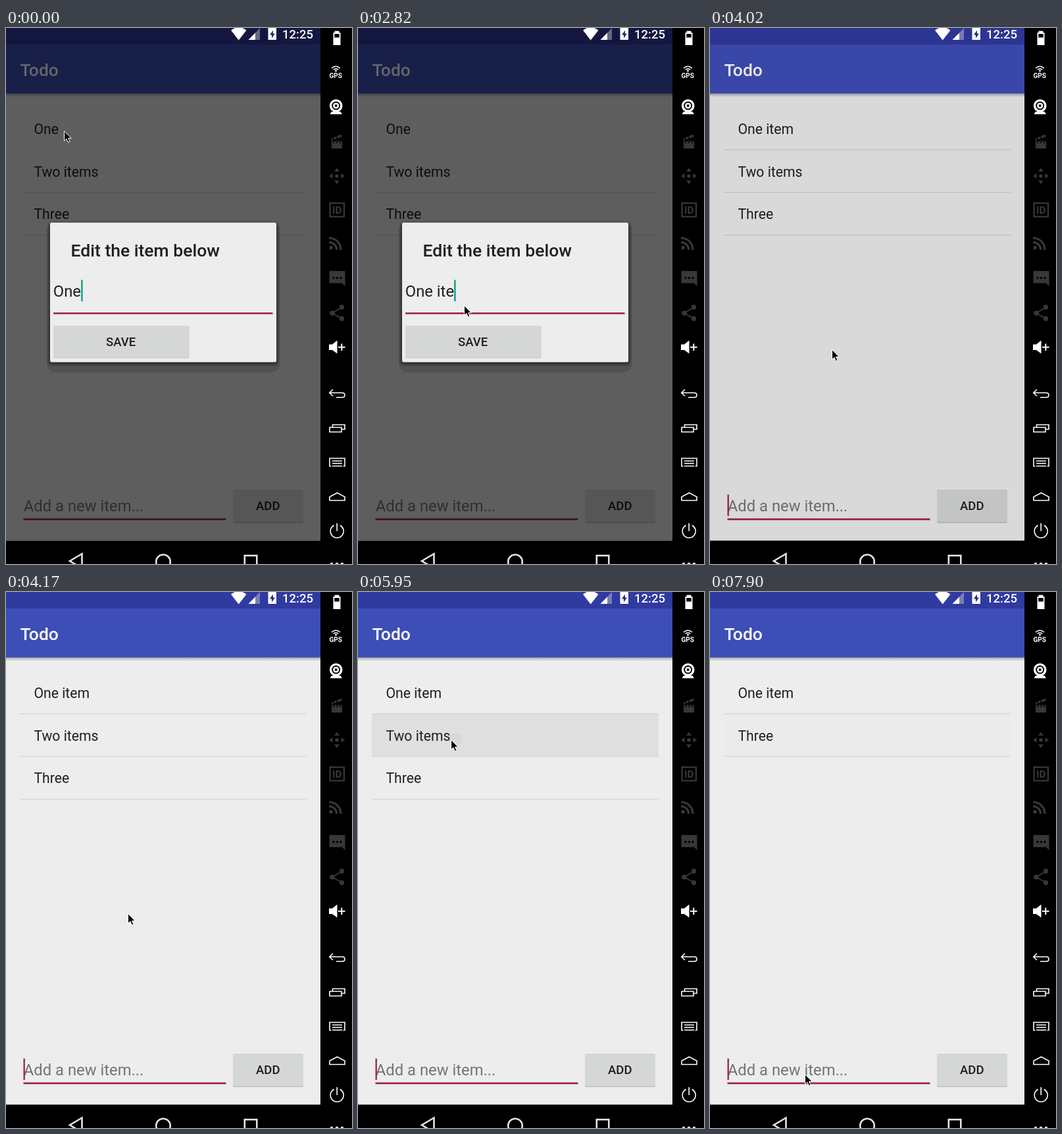
These frames come from a looping animation (526x814 px, 8000 ms). An HTML page:

```html
<!DOCTYPE html>
<html lang="en">
<head>
<meta charset="utf-8">
<title>Todo list</title>
<style>
html, body { margin: 0; width: 100%; height: 100%; overflow: hidden; background: #000; }
svg { display: block; width: 526px; height: 814px; font-family: Roboto, sans-serif; }
text { white-space: pre; }
.item { font-size: 21.2px; fill: #1f1f1f; }
.title { font-size: 26.5px; font-weight: 500; }
.field { font-size: 23.8px; }
.button { font-size: 18.5px; font-weight: 500; fill: #1f1f1f; text-anchor: middle; }
.off { fill: #373737; }
.line { fill: none; stroke: #fff; stroke-width: 1.6; }
</style>
</head>
<body>
<svg viewBox="0 0 526 814">
  <defs>
    <linearGradient id="fall" x2="0" y2="1">
      <stop offset="0" stop-opacity=".3"/>
      <stop offset="1" stop-opacity="0"/>
    </linearGradient>
    <filter id="soft" x="-10%" y="-10%" width="120%" height="120%"><feGaussianBlur stdDeviation="2"/></filter>
    <clipPath id="rowClip"><rect x="21" y="185" width="436" height="65"/></clipPath>
    <clipPath id="rss"><path d="M491 317h21v20h-21z"/></clipPath>
  </defs>
  <rect width="526" height="814"/>

  <!-- app -->
  <rect width="478" height="778.5" fill="#ededed"/>
  <rect y="99" width="478" height="6" fill="url(#fall)"/>
  <rect width="478" height="25" fill="#303a9f"/>
  <rect y="25" width="478" height="74.5" fill="#3d4eb8"/>
  <text class="title" x="21.4" y="72.5" fill="#fff">Todo</text>
  <g id="press">
    <rect x="21" y="185" width="436" height="65" fill="#000" fill-opacity=".058"/>
    <circle id="ripple" cx="148" cy="224" r="10" fill-opacity=".035" clip-path="url(#rowClip)"/>
  </g>
  <g fill="#d3d3d3">
    <rect id="rule1" x="21" y="184.3" width="436" height="1.2"/>
    <rect x="21" y="249" width="436" height="1.2"/>
    <rect id="rule3" x="21" y="314" width="436" height="1.2"/>
  </g>
  <text class="item" id="item1" x="42.4" y="161"></text>
  <text class="item" id="item2" x="42.4" y="225.5"></text>
  <text class="item" id="item3" x="42.4" y="290">Three</text>
  <text class="field" x="26.8" y="734" fill="#757575">Add a new item...</text>
  <rect x="26.5" y="744.7" width="308" height="2.7" fill="#9b2149"/>
  <rect id="caret" x="26.5" y="708.5" width="2.3" height="32.5" fill="#9b2149"/>
  <rect x="345" y="702" width="107" height="50" rx="2.5" fill-opacity=".17"/>
  <rect x="345" y="701" width="107" height="49" rx="2.5" fill="#d5d7d6"/>
  <text class="button" x="398.3" y="732.3">ADD</text>
  <rect id="dim" width="478" height="778.5"/>

  <!-- status bar -->
  <g fill="#fff">
    <path d="M342 3.5Q353.5 -5.500 365.500 3.500L353.700 18.500Z"/>
    <path d="M368.500 18L386 0V18Z" fill-opacity=".35"/>
    <path d="M368.500 18L379 7.500V18Z"/>
    <path d="M398.500 0H411V18H398.500Z"/>
    <text x="420" y="16" font-size="18.5" font-weight="500">12:25</text>
  </g>
  <path d="M406 3.500L400.800 10.500H404V15.500L409 8.500H406Z" fill="#252d75"/>

  <!-- dialog -->
  <g id="dialog">
    <rect x="62" y="294" width="354.500" height="229" rx="14" fill-opacity=".13"/>
    <rect x="65" y="296" width="348" height="215" rx="4" fill-opacity=".5" filter="url(#soft)"/>
    <rect x="67" y="295.500" width="344" height="212" rx="2.500" fill="#ededed"/>
    <text class="title" x="98.500" y="347" fill="#1f1f1f">Edit the item below</text>
    <text class="field" id="entry" x="71.800" y="408" fill="#1f1f1f"></text>
    <rect id="entryCaret" y="382.500" width="2.400" height="32.500" fill="#0d9c8c"/>
    <rect x="72" y="432" width="333.500" height="2.600" fill="#a0224e"/>
    <rect x="72" y="453" width="206.500" height="48.500" rx="2.500" fill-opacity=".14"/>
    <rect x="72" y="452" width="206.500" height="48" rx="2.500" fill="#d5d7d6"/>
    <text class="button" x="174.700" y="483">SAVE</text>
  </g>

  <!-- navigation bar -->
  <g fill="none" stroke="#e3e3e3" stroke-width="2.600">
    <path d="M115.500 798.500L97 809.500L115.500 820.500Z"/>
    <circle cx="239" cy="810.500" r="10.800"/>
    <rect x="362.800" y="801.200" width="18.500" height="18.500"/>
  </g>

  <!-- tool strip -->
  <rect x="478" width="48" height="814"/>
  <g fill="#fff">
    <path d="M499.500 4.500H506.500V7H508.500V26H497.500V7H499.500Z"/>
    <rect x="499.300" y="9" width="7.400" height="5.500" fill="#000"/>
    <text x="501.200" y="75.500" font-size="10" font-weight="700" text-anchor="middle">GPS</text>
    <circle cx="501.500" cy="65" r="1.500"/>
    <path class="line" d="M495 61Q501.500 55.500 508 61M497.700 63.500Q501.500 60 505.300 63.500"/>
    <circle cx="501.700" cy="118" r="9.800"/>
    <circle cx="501.700" cy="118" r="6.500" fill="#000"/>
    <circle cx="501.700" cy="118" r="4.600"/>
    <circle cx="501.700" cy="118" r="2" fill="#000"/>
    <path d="M495 127L492.500 131H511L508.500 127Z"/>
    <path d="M491 480.500H496L503.500 474.500V494.500L496 489H491Z"/>
    <path d="M505 483.800H509.300V479.500H511.300V483.800H515.500V485.800H511.300V490H509.300V485.800H505Z"/>
    <circle cx="495" cy="814" r="2.200"/><circle cx="503" cy="814" r="2.200"/><circle cx="511" cy="814" r="2.200"/>
  </g>
  <g class="off">
    <path d="M495 171.500H511V183H495ZM494.500 168L509.500 161.500L511 165L495.500 170.500Z"/>
    <path d="M497 175L499.500 171.500M502 175L504.500 171.500M507 175L509.500 171.500M498 170L498 166M503 168L502.500 164" stroke="#000" stroke-width="1.300"/>
    <circle cx="503" cy="224.700" r="2.800"/>
    <path d="M503 212.500L507 218H499ZM503 237L507 231.500H499ZM491 224.700L496.500 220.700V228.700ZM515 224.700L509.500 220.700V228.700Z"/>
    <rect x="492.500" y="266" width="21.500" height="20.500" fill="none" stroke="#373737" stroke-width="2.200"/>
    <text x="503.300" y="282" font-size="15.500" font-weight="700" text-anchor="middle">ID</text>
    <circle cx="494" cy="333.700" r="2.700"/>
    <g clip-path="url(#rss)" fill="none" stroke="#373737" stroke-width="3.200">
      <circle cx="491.500" cy="336.500" r="11"/><circle cx="491.500" cy="336.500" r="17.500"/>
    </g>
    <path d="M491.500 369H515.500V392L511 387.500H491.500Z"/>
    <g fill="#000"><circle cx="498" cy="379.500" r="1.700"/><circle cx="503.500" cy="379.500" r="1.700"/><circle cx="509" cy="379.500" r="1.700"/></g>
    <path d="M511 424L496 433L511 441.500" fill="none" stroke="#373737" stroke-width="2"/>
    <circle cx="510.500" cy="424" r="3.700"/><circle cx="496" cy="433" r="3.700"/><circle cx="510.500" cy="441.500" r="3.700"/>
  </g>
  <g class="line">
    <path d="M497 549L491.800 554L497 559M492 554H511Q515 554 515 557.500T511 561H502"/>
    <path d="M492 606.500H510V613.500H492ZM496.500 606V602.500H515V609.500H510.500"/>
    <path d="M494.500 665.500H492V653.500H515V665.500H512.500M496 657.500H511M496 661.300H511M496 665.200H511"/>
    <path d="M492 717.500V712L503.500 706L515 712V717.500Z"/>
    <path d="M498.700 755.300A10 10 0 1 0 507.700 755.300M503.200 752V764"/>
  </g>

  <path id="pointer" d="M0 0V14.800L3.400 11.700L5.900 17.200L8.400 16.100L6 10.900H10.600Z" fill="#000" stroke="#fff" stroke-width="1"/>
</svg>
<script>
const LOOP = 8000;
const $ = id => document.getElementById(id);
const set = (id, name, value) => $(id).setAttribute(name, value);
const show = (id, on) => set(id, 'visibility', on ? 'visible' : 'hidden');

// The screen refreshes in steps, so each value holds until the next one.
const hold = (steps, t) => steps.filter(s => s[0] <= t).pop();
const flips = (times, t) => times.filter(x => x <= t).length % 2 === 1;

const pointer = [
  [0, 88, 156], [1200, 90, 163], [1350, 104, 214], [1500, 130, 308], [1640, 151, 384], [1790, 161, 421],
  [3420, 171, 450], [3570, 185, 488],
  [4320, 184, 472], [4470, 178, 425], [4610, 167, 364], [4760, 157, 315], [4910, 150, 277], [5060, 141, 224],
  [6850, 156, 290], [7000, 208, 490], [7150, 242, 665], [7450, 180, 735], [7600, 146, 751], [7900, 144, 732]
];
const typed = [[0, 'One', 114.2], [2530, 'One ', 120.3], [2680, 'One it', 133.500], [2820, 'One ite', 146.200], [2970, 'One item', 167.500]];
const entryBlink = [0, 150, 750, 1200, 1790, 2230, 2530, 3420];
const fieldBlink = [4020, 4470, 4910, 5360, 5950, 6400, 6850, 7450, 7900];
const shade = [[0, 0.6], [4020, 0.085], [4170, 0]];
const press = [[0, 0, 10], [5950, 1, 10], [6100, 1, 40], [6250, 1, 110], [6400, 0.6, 320], [6550, 0.15, 0]];

function draw(t) {
  const open = t < 4020, removed = t >= 6400;
  const [, x, y] = hold(pointer, t);
  set('pointer', 'transform', `translate(${x + 0.5} ${y + 0.5})`);

  const [, text, caretX] = hold(typed, t);
  $('entry').textContent = text;
  set('entryCaret', 'x', caretX);
  show('dialog', open);
  show('entryCaret', open && flips(entryBlink, t));
  show('caret', flips(fieldBlink, t));
  set('dim', 'fill-opacity', hold(shade, t)[1]);

  $('item1').textContent = t < 3870 ? 'One' : 'One item';
  $('item2').textContent = removed ? 'Three' : 'Two items';
  show('item3', !removed);
  show('rule1', !open);
  show('rule3', !removed);

  const [, glow, radius] = hold(press, t);
  set('press', 'opacity', glow);
  set('ripple', 'r', radius);
}

const start = performance.now();
function tick() {
  draw((performance.now() - start) % LOOP);
  requestAnimationFrame(tick);
}
draw(0);
requestAnimationFrame(tick);
</script>
</body>
</html>
```
